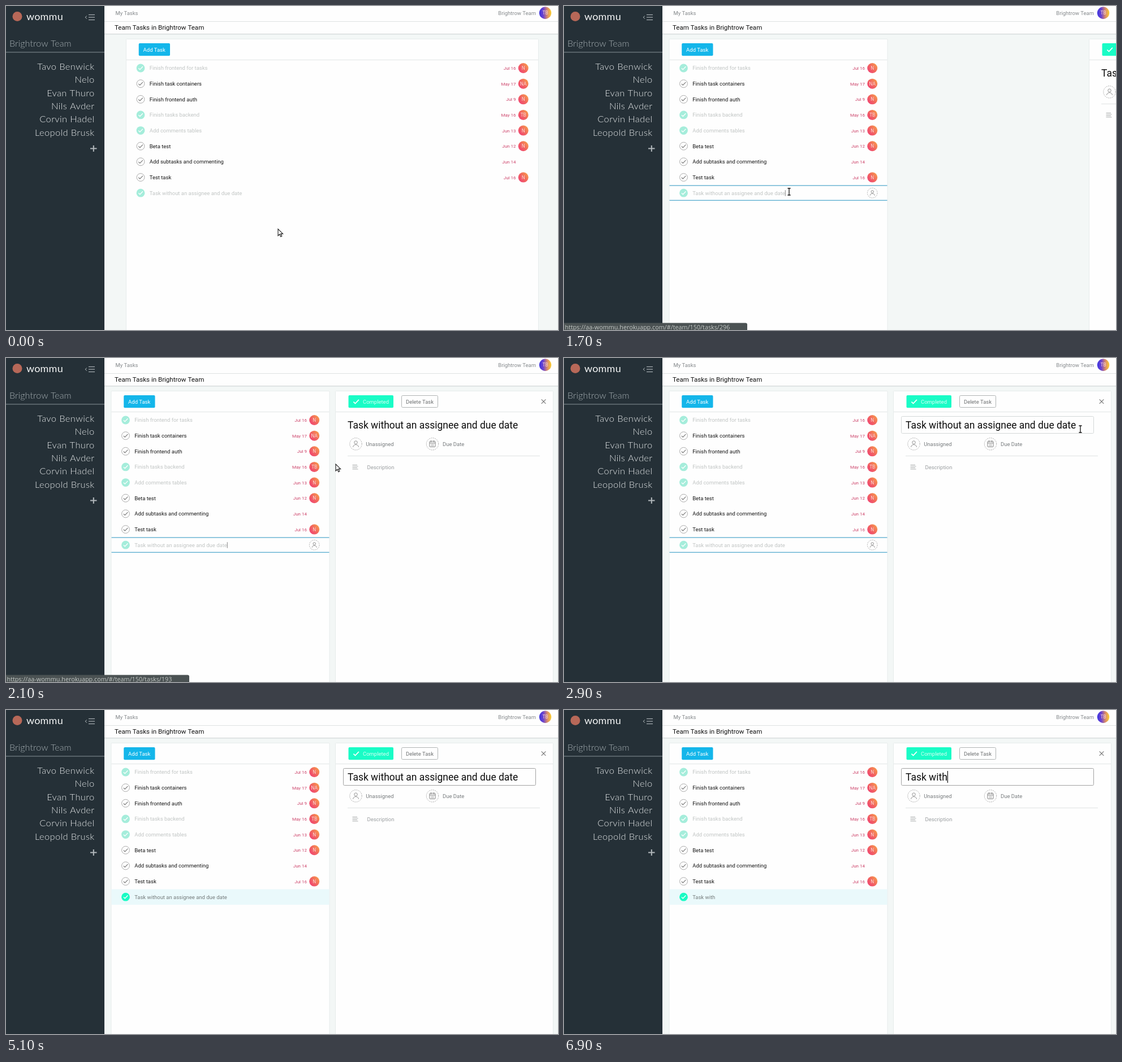
An HTML page with a canvas that plays this animation: 976x574 px, repeating every 8 s.

```html
<!DOCTYPE html>
<html lang="en">
<head>
<meta charset="utf-8">
<title>Team tasks</title>
<style>
html, body { margin: 0; width: 100%; height: 100%; overflow: hidden; background: #f3f7f6; }
canvas { display: block; width: 976px; height: 574px; }
</style>
</head>
<body>
<canvas id="stage"></canvas>
<script>
const W = 976, H = 574, LOOP = 8000, STEP = 100;
const canvas = document.getElementById('stage');
const ctx = canvas.getContext('2d');
const dpr = window.devicePixelRatio || 1;
canvas.width = W * dpr;
canvas.height = H * dpr;

const TEAM = 'Brightrow Team';
const MEMBERS = ['Tavo Benwick', 'Nelo', 'Evan Thuro', 'Nils Avder', 'Corvin Hadel', 'Leopold Brusk'];
const TITLE = 'Task without an assignee and due date';
const ROWS = [
  ['Finish frontend for tasks', 'Jul 16', 'N', true],
  ['Finish task containers', 'May 17', 'NA', false],
  ['Finish frontend auth', 'Jul 9', 'N', false],
  ['Finish tasks backend', 'May 16', 'TB', true],
  ['Add comments tables', 'Jun 13', 'N', true],
  ['Beta test', 'Jun 12', 'N', false],
  ['Add subtasks and commenting', 'Jun 14', '', false],
  ['Test task', 'Jul 16', 'N', false],
  [TITLE, '', '', true]
];
const LAST = ROWS.length - 1;
const rowY = i => 110 + 27.65 * i;

// Moments of the story, in ms
const OPEN = 1600, LEAVE = 2500, BLUR = 2900, EDIT = 3500;

const POINTER = [
  [300, 481, 395], [400, 477, 391], [500, 461, 378], [600, 437, 358], [700, 415, 341],
  [800, 402, 332], [900, 398, 329], [1700, 398, 329], [1800, 424, 308], [1900, 480, 262],
  [2000, 543, 215], [2100, 583, 188], [2200, 668, 158], [2300, 790, 136], [2400, 888, 126],
  [2500, 913, 126], [3400, 913, 126], [3500, 917, 130]
];
const PANE = [[1600, 977], [1700, 929], [1800, 780], [1900, 634], [2000, 583]];
const LENGTH = [[0, 37], [5300, 36], [5700, 35], [5800, 33]];

function track(keys, t, col = 1) {
  if (t <= keys[0][0]) return keys[0][col];
  for (let i = 1; i < keys.length; i++) {
    const a = keys[i - 1], b = keys[i];
    if (t <= b[0]) return a[col] + (b[col] - a[col]) * (t - a[0]) / (b[0] - a[0]);
  }
  return keys[keys.length - 1][col];
}

// Backspace held down, then tapped
function typedLength(t) {
  if (t >= 6700) return Math.max(9, 11 - (t - 6700) / 100);
  if (t >= 5800) return Math.max(12, 33 - 3 * (t - 5800) / 100);
  return LENGTH.filter(k => k[0] <= t).pop()[1];
}

function rect(x, y, w, h, fill) {
  ctx.fillStyle = fill;
  ctx.fillRect(x, y, w, h);
}

function roundRect(x, y, w, h, r, fill, stroke) {
  ctx.beginPath();
  ctx.roundRect(x, y, w, h, r);
  if (fill) { ctx.fillStyle = fill; ctx.fill(); }
  if (stroke) { ctx.strokeStyle = stroke; ctx.lineWidth = 1; ctx.stroke(); }
}

function disc(x, y, r, fill) {
  ctx.beginPath();
  ctx.arc(x, y, r, 0, 7);
  ctx.fillStyle = fill;
  ctx.fill();
}

function ring(x, y, r, color, dash = []) {
  ctx.setLineDash(dash);
  ctx.beginPath();
  ctx.arc(x, y, r, 0, Math.PI * 2);
  ctx.strokeStyle = color;
  ctx.lineWidth = 0.9;
  ctx.stroke();
  ctx.setLineDash([]);
}

function line(points, color, width = 1) {
  ctx.beginPath();
  points.forEach(([x, y], i) => i ? ctx.lineTo(x, y) : ctx.moveTo(x, y));
  ctx.strokeStyle = color;
  ctx.lineWidth = width;
  ctx.stroke();
}

function text(str, x, y, size, color, align = 'left', font = 'Roboto, sans-serif', weight = 400, gap = 0) {
  ctx.font = `${weight} ${size}px ${font}`;
  ctx.letterSpacing = gap + 'px';
  ctx.textAlign = align;
  ctx.fillStyle = color;
  ctx.fillText(str, x, y);
  const w = ctx.measureText(str).width;
  ctx.letterSpacing = '0px';
  return w;
}

function tick(x, y, color, k = 1, width = 1.3) {
  line([[x - 3.7 * k, y + 0.2 * k], [x - 1.2 * k, y + 2.6 * k], [x + 3.9 * k, y - 2.7 * k]], color, width);
}

function person(x, y, r) {
  const k = r / 10.5;
  ring(x, y, r, '#a3a3a3', [2, 1.4]);
  ring(x, y - 2.6 * k, 2.7 * k, '#858585');
  ctx.beginPath();
  ctx.moveTo(x - 4.8 * k, y + 5.5 * k);
  ctx.bezierCurveTo(x - 4.8 * k, y - 0.2 * k, x + 4.8 * k, y - 0.2 * k, x + 4.8 * k, y + 5.5 * k);
  ctx.stroke();
}

function avatar(x, y, r, label, stops, tilt) {
  const g = ctx.createLinearGradient(x - r, y + r * tilt, x + r, y - r * tilt);
  stops.forEach((c, i) => g.addColorStop(i / (stops.length - 1), c));
  disc(x, y, r, g);
  text(label, x, y + 3, 8.2, '#fbdcd6', 'center');
}

function panel(x, w) {
  roundRect(x - 0.5, 58.5, w + 1, 530, 1, '#fefefe', '#e7ecec');
  rect(x, 95, w, 1, '#e1e5e5');
}

function sidebar() {
  const light = 'Lato, "Open Sans", sans-serif';
  rect(0, 0, 174, H, '#253037');
  disc(20, 18.5, 8.5, '#b76858');
  text('wommu', 36, 25, 18, '#f4f5f5', 'left', light, 400, 0.2);
  line([[143, 17.5], [140, 20], [143, 22.5]], '#a9b0b3');
  [15.5, 20, 24.5].forEach(y => line([[146, y], [157, y]], '#a9b0b3', 1.2));
  text(TEAM, 6, 71.5, 16.2, '#a4adb1', 'left', light, 300);
  rect(0, 81.4, 174, 1, '#899499');
  MEMBERS.forEach((m, i) => text(m, 156.5, 113 + 23.35 * i, 16.5, '#e4e7e8', 'right', light, 300, 0.35));
  line([[149, 252.5], [160.5, 252.5]], '#b3b9bc', 2);
  line([[154.8, 247], [154.8, 258]], '#b3b9bc', 2);
}

function header() {
  rect(174, 0, W - 174, 49, '#fefefe');
  rect(174, 27, W - 174, 1, '#dfe2e2');
  rect(174, 49, W - 174, 1, '#d5dada');
  rect(174, 50, W - 174, 1, '#e8eded');
  text('My Tasks', 193.5, 15.5, 9.47, '#85898c');
  text(TEAM, 937, 15.5, 9.47, '#85898c', 'right');
  avatar(953.5, 12.3, 10.7, 'TB', ['#3d35e0', '#6b43cf', '#d98a6c', '#fbd02f'], 0);
  text('Team Tasks in ' + TEAM, 192, 42, 11.55, '#111');
}

function taskRow(i, x, right, t, hovered) {
  const [name, due, who, done] = ROWS[i];
  const y = rowY(i), w = right - x;
  const top = Math.round(y - 14), last = i === LAST;
  const focused = last && t >= OPEN && t < EDIT;
  const chosen = !last || t < EDIT ? 0 : t < EDIT + STEP ? 0.5 : 1;

  if (focused) {
    rect(x, top + 0.5, w, 1.2, '#4ba6cb');
    rect(x, top + 26.7, w, 1.2, '#4ba6cb');
  } else if (chosen) {
    ctx.globalAlpha = chosen;
    rect(x, top + 0.5, w, 27.5, '#eaf9fb');
    ctx.globalAlpha = 1;
  } else if (hovered) {
    rect(x, top, w, 28, '#f3f7f6');
    rect(x, top, w, 1, '#dde3e3');
    rect(x, top + 27, w, 1, '#dde3e3');
  }

  const cx = x + 25;
  if (done) {
    disc(cx, y, 7.4, ['#a5eddb', '#60f4d0', '#18fbc4'][chosen * 2]);
    tick(cx, y, '#fff');
  } else {
    ring(cx, y, 6.9, '#a2a2a2');
    tick(cx, y, '#777', 1, 1.1);
  }
  const label = last ? name.slice(0, typedLength(t)) : name;
  const color = !done ? '#151515' : ['#c1c5c4', '#9a9f9f', '#747b7b'][chosen * 2];
  const len = text(label, x + 40.7, y + 3.4, 9.47, color);
  if (focused && t < BLUR) rect(x + 40.7 + len, y - 5, 0.9, 10.5, '#777');

  if (due) text(due, right - 39.5, y + 3, 8, '#cc4068', 'right');
  if (who) avatar(right - 26.3, y, 9, who, ['#ef3f76', '#f2665f', '#f8a24a'], 0.8);
  if (focused || (hovered && last && !chosen)) person(right - 26.3, y, 8.8);
}

function taskList(t, x, right, hover) {
  panel(x, right - x);
  roundRect(x + 21.7, 66, 55.3, 22.3, 2, '#14b6ea');
  text('Add Task', x + 49.2, 80.8, 9.47, '#fff', 'center');
  ROWS.forEach((_, i) => taskRow(i, x, right, t, i === hover));
}

function details(t, x) {
  ctx.save();
  ctx.translate(x, 0);
  panel(0, 384);
  roundRect(22.5, 66, 79.5, 22.3, 2, '#19fcc6');
  tick(36, 77.3, '#fff', 1.25, 1.6);
  text('Completed', 48, 80.8, 9.47, '#d9fff5');
  roundRect(116.5, 66.5, 64, 21, 2, null, '#b0b4b4');
  text('Delete Task', 148.5, 80.8, 9.47, '#6c6f70', 'center');
  line([[363.7, 73.3], [371.3, 80.9]], '#777', 1.2);
  line([[371.3, 73.3], [363.7, 80.9]], '#777', 1.2);

  if (t >= 2400) roundRect(13.5, 103.5, 340, 30, 2, null, t < EDIT ? '#d4d8d8' : '#a2a2a2');
  const len = text(TITLE.slice(0, typedLength(t)), 21, 124.5, 17.45, '#0c0c0c');
  const caret = (t >= EDIT && t < 3900) || t === 5000 || t >= 5700;
  if (caret) rect(21 + len, 108, 1.2, 21, '#111');

  person(35.5, 152.3, 10.7);
  text('Unassigned', 53.2, 155.8, 9.47, '#777b7d');
  ring(171, 152.3, 10.7, '#a3a3a3', [2, 1.4]);
  roundRect(165.9, 147.6, 10.2, 9.8, 1, null, '#858585');
  line([[166, 150.6], [176, 150.6]], '#858585');
  line([[168.5, 146], [168.5, 149]], '#858585');
  line([[173.5, 146], [173.5, 149]], '#858585');
  line([[168.2, 153], [173.8, 153]], '#a0a0a0', 0.9);
  line([[168.2, 155.2], [173.8, 155.2]], '#a0a0a0', 0.9);
  text('Due Date', 189, 155.8, 9.47, '#777b7d');
  rect(21, 173, 340, 1, '#dfe3e3');
  [189.5, 192, 194.5, 197].forEach((y, i) => line([[29.5, y], [i % 2 ? 39.5 : 38, y]], '#a5a9a9', 0.9));
  text('Description', 55.5, 196.5, 9.47, '#9a9ea0');
  ctx.restore();
}

function status(id) {
  roundRect(0, 561.4, 324, 14, [0, 3, 0, 0], '#4b5253');
  text('https://aa-wommu.herokuapp.com/#/team/150/tasks/' + id, 1.5, 573, 10.8, '#c3c8c5',
    'left', '"Open Sans", "Noto Sans", sans-serif');
}

const CURSORS = {
  arrow: () => outline('M0 0V12L2.9 9.3L4.8 13.7L6.8 12.8L4.9 8.6H8.6Z'),
  hand: () => outline('M-2.3 -2.2Q-1.2 -3.2 -.3 -2V2L5 2.6Q6.7 3 6.5 5L5.6 9.5H-1.3L-4.4 5.2Q-4.6 3.6 -3.3 3.8L-2.3 4.8Z'),
  beam: () => {
    const p = new Path2D('M-2.6 -6H-.6L0 -5.4L.6 -6H2.6M0 -5.4V5.4M-2.6 6H-.6L0 5.4L.6 6H2.6');
    ctx.strokeStyle = '#fff';
    ctx.lineWidth = 2.6;
    ctx.stroke(p);
    ctx.strokeStyle = '#111';
    ctx.lineWidth = 1.3;
    ctx.stroke(p);
  }
};

function outline(d) {
  const p = new Path2D(d);
  ctx.fillStyle = '#fff';
  ctx.fill(p);
  ctx.strokeStyle = '#1a1a1a';
  ctx.lineWidth = 1.1;
  ctx.stroke(p);
}

function pointer(kind, x, y) {
  ctx.save();
  ctx.translate(x, y);
  CURSORS[kind]();
  ctx.restore();
}

function draw(t) {
  const open = t >= OPEN;
  const left = open ? 186.5 : 213, right = open ? 571.5 : 941;
  const x = track(POINTER, t), y = track(POINTER, t, 2);
  const row = Math.round((y - 110) / 27.65);
  const hover = x < right && row >= 0 && row <= LAST ? row : -1;

  ctx.setTransform(dpr, 0, 0, dpr, 0, 0);
  rect(0, 0, W, H, '#f3f7f6');
  header();
  taskList(t, left, right, hover);
  if (open) details(t, track(PANE, t));
  sidebar();
  if (t < LEAVE && (hover >= 0 || open)) status(hover === LAST ? 296 : 193);

  if (t < 3800) {
    const overTitle = t >= 2400;
    const overText = open && hover === LAST;
    pointer(overTitle || overText ? 'beam' : hover >= 0 ? 'hand' : 'arrow', x, y);
  }
}

const start = performance.now();
function frame(now) {
  const t = Math.max(0, now - start) % LOOP;
  draw(Math.floor(t / STEP) * STEP);
  requestAnimationFrame(frame);
}
draw(0);
requestAnimationFrame(frame);
</script>
</body>
</html>
```
